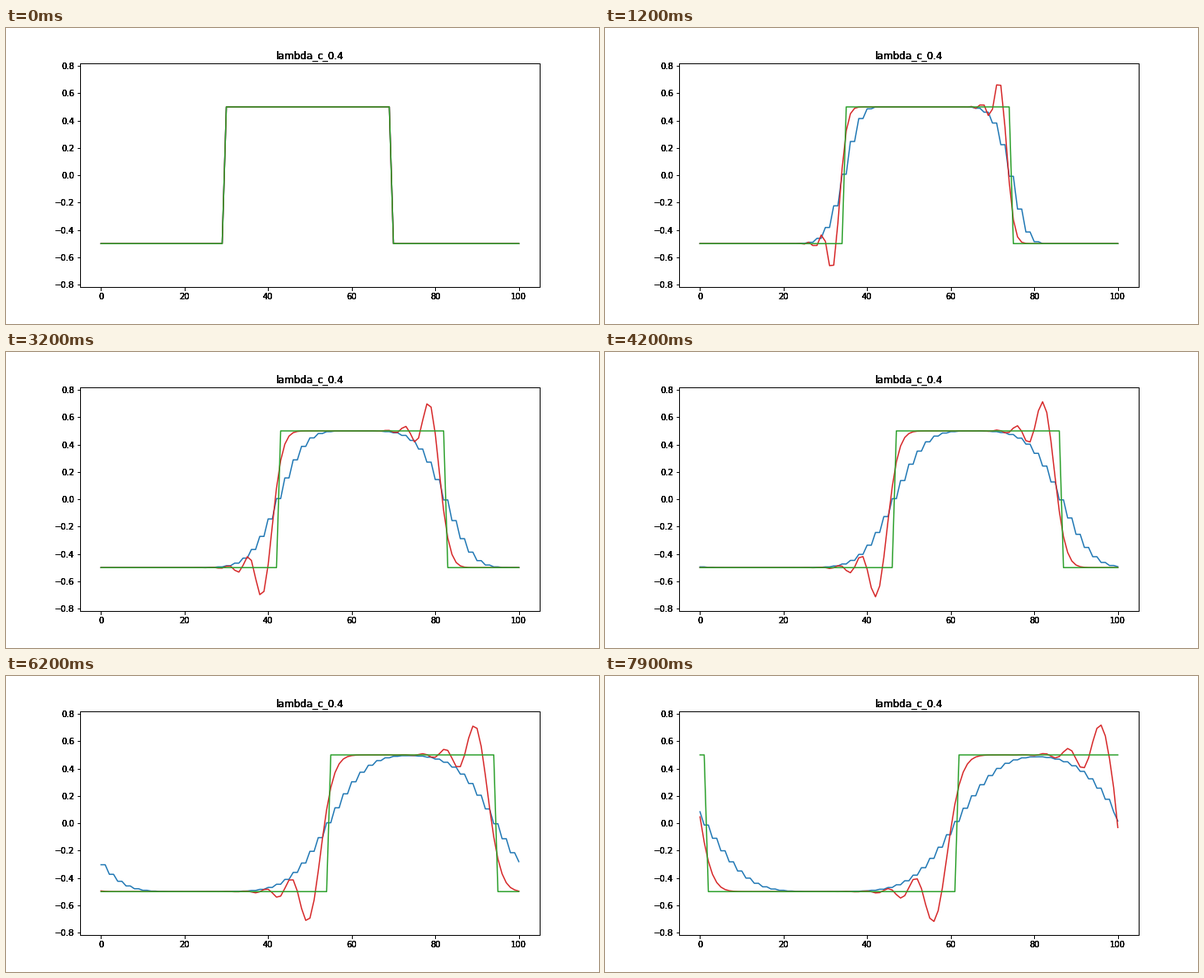
A matplotlib script for the animation above (8000 ms loop, 720 by 360 pixels).

```python
import numpy as np
import matplotlib.pyplot as plt
from matplotlib.animation import FuncAnimation

CELLS, STEPS, C = 100, 80, 0.4

plt.rcParams.update({"font.family": "DejaVu Sans", "font.size": 10})

cells = np.arange(CELLS)
x = np.arange(CELLS + 1)


def pulse(pos):
    return np.where((pos >= 30) & (pos < 70), 0.5, -0.5)


def lax_friedrichs(u):
    left, right = np.roll(u, 1), np.roll(u, -1)
    return (left + right) / 2 - C / 2 * (right - left)


def lax_wendroff(u):
    left, right = np.roll(u, 1), np.roll(u, -1)
    return u - C / 2 * (right - left) + C**2 / 2 * (right - 2 * u + left)


def solve(scheme):
    """Periodic solution; the closing point holds the previous step's u[0]."""
    u, ghost, rows = pulse(cells), -0.5, []
    for _ in range(STEPS):
        rows.append(np.append(u, ghost))
        u, ghost = scheme(u), u[0]
    return rows


def exact(n):
    shift = -(-2 * n // 5)  # ceil(C * n)
    return pulse((x - shift) % CELLS)


def make_axes(fig):
    ax = fig.add_axes([0.125, 0.125, 0.775, 0.755])
    ax.set(xlim=(-5, 105), ylim=(-0.8175, 0.8175),
           xticks=range(0, 101, 20), yticks=np.arange(-4, 5) / 5)
    ax.set_title("lambda_c_0.4", fontsize=12)
    return ax


fig = plt.figure(figsize=(10, 5), dpi=72, facecolor="white")
ax = make_axes(fig)
# Stacked frames give the heavy, hard-edged labels.
for _ in range(4):
    make_axes(fig).patch.set_visible(False)

friedrichs, wendroff = solve(lax_friedrichs), solve(lax_wendroff)
lines = [ax.plot(x, exact(0), color=c, lw=1.5)[0]
         for c in ("tab:blue", "tab:red", "tab:green")]


def update(n):
    for line, y in zip(lines, (friedrichs[n], wendroff[n], exact(n))):
        line.set_ydata(y)
    return lines


anim = FuncAnimation(fig, update, frames=STEPS, interval=100,
                     repeat=True, repeat_delay=0, blit=False)
plt.show()
```
